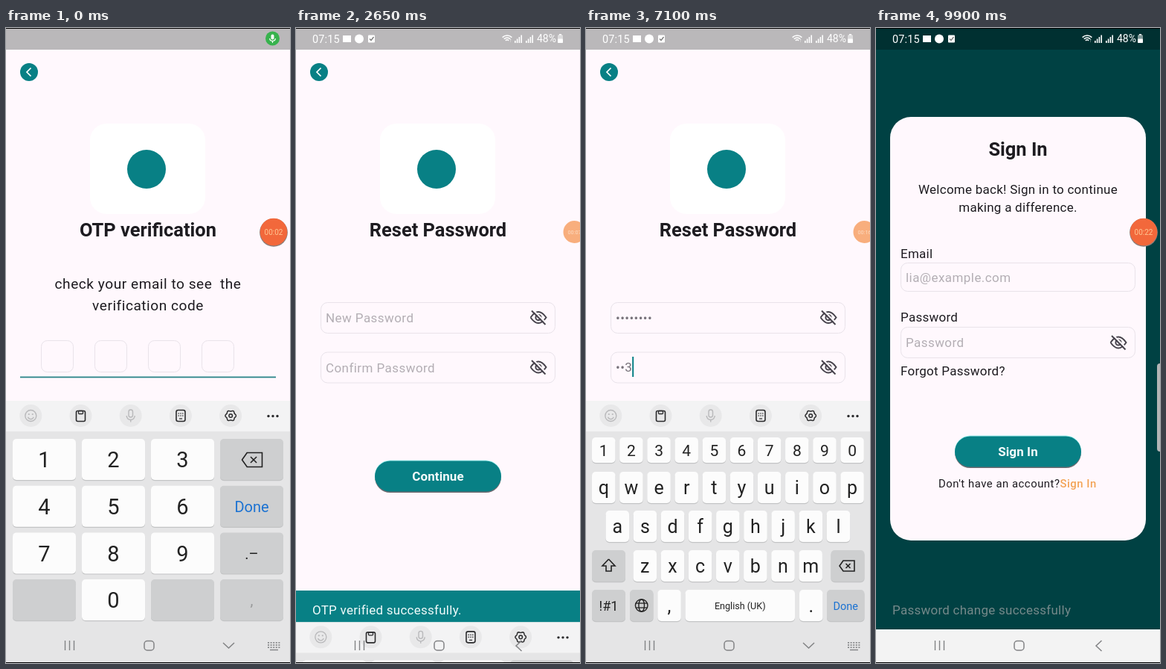
Animation, 382 px wide and 850 px high, one loop 9950 ms. Source, as an HTML page with a canvas:

```html
<!DOCTYPE html>
<html lang="en">
<head>
<meta charset="utf-8">
<title>Password reset</title>
<style>
  html, body { margin: 0; width: 100%; height: 100%; overflow: hidden; background: #fff8fd; }
  canvas { display: block; }
</style>
</head>
<body>
<canvas id="stage" width="382" height="850"></canvas>
<script>
const LOOP = 9950, W = 382, H = 850, NAV = 805;
const TEAL = '#088085', PAGE = '#fff8fd', INK = '#1d1b20', HINT = '#b3aeb4', EDGE = '#e9e3ea';
const DP = 382 / 360;
const g = document.getElementById('stage').getContext('2d');

// When each character appears
const otpKeys = [600, 1050, 1600, 2200];
const newKeys = [4550, 4750, 4900, 5050, 5250, 5500, 6200, 6300];
const confirmKeys = [6700, 6900, 7050, 7250, 7400, 7550, 7700, 8200];

const clamp = x => Math.max(0, Math.min(1, x));
const ramp = (t, a, b) => clamp((t - a) / (b - a));
const ease = p => p < .5 ? 4 * p ** 3 : 1 - 4 * (1 - p) ** 3;
const move = (t, a, b) => ease(ramp(t, a, b));
const typed = (keys, t) => keys.filter(k => k <= t).length;

function box(x, y, w, h, r, fill, stroke, lw = 1) {
  g.beginPath();
  g.roundRect(x, y, w, h, r);
  if (fill) { g.fillStyle = fill; g.fill(); }
  if (stroke) { g.strokeStyle = stroke; g.lineWidth = lw; g.stroke(); }
}
function disc(x, y, r, fill) {
  g.beginPath();
  g.arc(x, y, r, 0, 7);
  g.fillStyle = fill;
  g.fill();
}
function ring(x, y, r, color, lw) {
  g.beginPath();
  g.arc(x, y, r, 0, 7);
  g.strokeStyle = color;
  g.lineWidth = lw;
  g.stroke();
}
function line(color, lw, ...pts) {
  g.beginPath();
  for (let i = 0; i < pts.length; i += 2) g.lineTo(pts[i], pts[i + 1]);
  g.strokeStyle = color;
  g.lineWidth = lw;
  g.stroke();
}
// y is the middle of the capitals
function text(s, x, y, size, color, { align = 'left', weight = 400, gap = 0 } = {}) {
  g.font = `${weight} ${size}px Roboto, sans-serif`;
  g.letterSpacing = gap + 'px';
  g.textAlign = align;
  g.fillStyle = color;
  g.fillText(s, x, y + size * .355);
  return g.measureText(s).width;
}
const mid = (s, x, y, size, color, weight = 400, gap = 0) =>
  text(s, x, y, size, color, { align: 'center', weight, gap });

function caret(x, y, t, since) {
  if (t >= since && Math.floor((t - since) / 250) % 2 === 0) {
    g.fillStyle = TEAL;
    g.fillRect(x, y - 14, 2, 27);
  }
}
function eyeOff(x, y) {
  const c = '#47434c';
  g.beginPath();
  g.moveTo(x - 10.5, y);
  g.quadraticCurveTo(x, y - 15, x + 10.5, y);
  g.quadraticCurveTo(x, y + 15, x - 10.5, y);
  g.strokeStyle = c;
  g.lineWidth = 2;
  g.stroke();
  ring(x, y, 3.6, c, 2);
  line(PAGE, 2, x - 7, y - 10, x + 11, y + 8);
  line(c, 2, x - 9, y - 9, x + 9.5, y + 9.5);
}
function button(label, cy) {
  box(106, cy - 19, 170, 41, 20.5, '#6d6a70');
  box(106, cy - 21.5, 170, 41, 20.5, '#9ff0ee');
  box(106, cy - 20.5, 170, 41, 20.5, TEAL);
  mid(label, 191, cy, 16 * DP, '#f4fbfb', 700, .1);
}
function field(y, h, hint) {
  box(33.5, y + .5, 315, h, 9, null, EDGE);
  if (hint) text(hint, 40, y + h / 2 + .5, 16 * DP, HINT, { gap: .45 });
}
function secretField(y, hint, keys, focus, blur, t) {
  const n = t < 9150 ? typed(keys, t) : 0, cy = y + 20.5;
  field(y, 41, n ? '' : hint);
  const last = n ? keys[n - 1] : focus;
  const shown = n && t - last < 750 && t < blur;
  const s = shown ? '•'.repeat(n - 1) + n : '•'.repeat(n);
  const w = text(s, 40, cy, 16 * DP, '#77727a', { gap: .4 });
  if (t < blur) caret(40 + w, cy, t, last);
  eyeOff(326, cy);
}
function header(title) {
  g.fillStyle = PAGE;
  g.fillRect(0, 0, W, NAV);
  g.fillStyle = '#bab8ba';
  g.fillRect(0, 0, W, 29);
  disc(31, 59, 12, TEAL);
  line('#fff', 1.7, 33.5, 53.5, 28, 59, 33.5, 64.5);
  box(113, 128, 155, 121, 22, '#fff');
  disc(189, 189, 26, TEAL);
  mid(title, 191, 270, 24 * DP, INK, 700);
}
function otpPage(t) {
  header('OTP verification');
  mid('check your email to see  the', 191, 342.5, 18 * DP, INK, 400, .53);
  mid('verification code', 191, 371, 18 * DP, INK, 400, .53);
  const n = typed(otpKeys, t);
  for (let i = 0; i < 4; i++) {
    const x = 47.5 + 72 * i;
    box(x, 418.5, 43, 42, 8, null, EDGE);
    if (i < n) mid('5984'[i], x + 20.5, 440.7, 16 * DP, INK);
    else if (i === n) caret(x + 20, 439.5, t, n ? otpKeys[n - 1] : -250);
  }
  g.fillStyle = '#2b8589';
  g.fillRect(19, 466.5, 344, 1.8);
  button('Resend code', 598);
}
function resetPage(t) {
  header('Reset Password');
  secretField(367, 'New Password', newKeys, 3750, 6600, t);
  secretField(433.5, 'Confirm Password', confirmKeys, 6600, 8800, t);
  button('Continue', 600);
}
function signInPage() {
  g.fillStyle = '#004143';
  g.fillRect(0, 0, W, NAV);
  g.fillStyle = '#003031';
  g.fillRect(0, 0, W, 29);
  box(19, 119, 344, 567, 28, PAGE);
  mid('Sign In', 191, 162, 24 * DP, INK, 700);
  mid('Welcome back! Sign in to continue', 191, 216, 16 * DP, INK, 400, .27);
  mid('making a difference.', 191, 240, 16 * DP, INK, 400, .27);
  const label = { gap: .27 };
  text('Email', 33, 302, 16 * DP, INK, label);
  field(314, 38, 'lia@example.com');
  text('Password', 33, 387, 16 * DP, INK, label);
  field(400, 41, 'Password');
  eyeOff(326, 421);
  text('Forgot Password?', 33, 459, 16 * DP, INK, label);
  button('Sign In', 567);
  const w = text("Don't have an account?", 84, 609.5, 14 * DP, INK, { gap: .53 });
  text('Sign In', 84 + w, 609.5, 14 * DP, '#f3a457', { gap: .53, weight: 500 });
  text('Password change successfully', 22, 779, 16 * DP, '#75898a', { gap: .27 });
}
function dim(t, alpha, start) {
  if (alpha <= 0) return;
  g.fillStyle = `rgba(0,0,0,${alpha})`;
  g.fillRect(0, 0, W, NAV);
  ring(191, 402, 25, '#3b3a3b', 8.5);
  const p = ((t - start) / 700 % 1 + 1) % 1, a = -Math.PI / 2 + p * 6.28;
  g.beginPath();
  g.arc(191, 402, 25, a, a + .02 + 3 * Math.sin(p * Math.PI) ** 2);
  g.lineCap = 'round';
  g.strokeStyle = TEAL;
  g.lineWidth = 9;
  g.stroke();
  g.lineCap = 'butt';
}

// Keyboard
function toolbar() {
  g.fillStyle = '#f3f3f4';
  g.fillRect(0, 499, W, 41);
  const dark = '#2b2b2d', pale = '#b9b9bb', y = 519;
  for (let i = 0; i < 5; i++) disc(33.3 + 67.2 * i, y, 15, '#e8e8e9');
  ring(33.3, y, 7.5, pale, 1.4);
  disc(30.8, y - 2, 1.1, pale);
  disc(35.8, y - 2, 1.1, pale);
  g.beginPath();
  g.arc(33.3, y + .5, 4, .3, 2.84);
  g.stroke();
  box(94.5, y - 6.5, 12, 14, 2, null, dark, 1.6);
  box(97.5, y - 6.5, 6, 4, 1, null, dark, 1.3);
  box(165, y - 8, 5.5, 10, 3, null, pale, 1.4);
  g.beginPath();
  g.arc(167.7, y, 5.5, 0, Math.PI);
  g.stroke();
  line(pale, 1.4, 167.7, y + 5.5, 167.7, y + 8.5);
  box(229, y - 7.5, 12, 15, 2.5, null, dark, 1.6);
  for (let i = 0; i < 6; i++) disc(232.2 + i % 3 * 2.8, y - 3 + (i > 2) * 3, .8, dark);
  line(dark, 1.2, 233, y + 4, 237, y + 4);
  g.beginPath();
  for (let i = 0; i <= 48; i++) {
    const a = i / 48 * 2 * Math.PI, r = 6.6 + .7 * Math.cos(6 * a);
    g.lineTo(302.2 + r * Math.cos(a), y + r * Math.sin(a));
  }
  g.strokeStyle = dark;
  g.lineWidth = 1.5;
  g.stroke();
  ring(302.2, y, 2.3, dark, 1.5);
  for (const x of [353, 359, 365]) disc(x, y + .5, 1.7, dark);
}
function key(x, y, w, h, label, size, { gray, color = '#222', down } = {}) {
  box(x, y + 1.2, w, h, 5, '#c3c4c5');
  box(x, y, w, h, 5, down ? '#dcdddf' : gray ? '#cecfd0' : '#fcfcfc');
  if (label) mid(label, x + w / 2, y + h / 2 + .5, size, color);
}
function backspace(x, y, s) {
  line('#222', 1.6, x - 10 * s, y, x - 5 * s, y - 7 * s, x + 10 * s, y - 7 * s,
    x + 10 * s, y + 7 * s, x - 5 * s, y + 7 * s, x - 10 * s, y, x - 5 * s, y - 7 * s);
  line('#222', 1.6, x - 1.5 * s, y - 3 * s, x + 4.5 * s, y + 3 * s);
  line('#222', 1.6, x + 4.5 * s, y - 3 * s, x - 1.5 * s, y + 3 * s);
}
const pressed = (keys, t) => keys.findIndex(k => t >= k - 10 && t < k + 45);

function numberPad(t) {
  const down = '598'[pressed(otpKeys, t)];
  const rows = [['1', '2', '3', ''], ['4', '5', '6', 'Done'], ['7', '8', '9', '.–'], ['', '0', '', ',']];
  rows.forEach((row, r) => row.forEach((label, c) => {
    const gray = c === 3 || !label;
    key(9 + 93 * c, 550 + 62.7 * r, 85, 55, label, gray ? 20 : 29,
      { gray, down: label && label === down, color: label === 'Done' ? '#1b72d2' : label === ',' ? '#98999a' : '#222' });
  }));
  backspace(331, 578, 1.35);
}
function letters(t) {
  const down = Math.max(pressed(newKeys, t), pressed(confirmKeys, t));
  const row = (s, x, y, h, size) => [...s].forEach((ch, i) =>
    key(x + 37.15 * i, y, 31.5, h, ch, size, { down: h < 40 && i === down }));
  row('1234567890', 8, 548, 34, 21);
  row('qwertyuiop', 8, 594, 42, 25);
  row('asdfghjkl', 26.5, 646, 42, 25);
  row('zxcvbnm', 63.5, 699, 42, 25);
  key(8, 699, 45, 42, '', 0, { gray: 1 });
  line('#222', 1.6, 30.5, 711, 22, 720, 27, 720, 27, 727, 34, 727, 34, 720, 39, 720, 30.5, 711);
  key(329.5, 699, 45, 42, '', 0, { gray: 1 });
  backspace(351, 720, 1);
  key(8, 752, 45, 42, '!#1', 18, { gray: 1 });
  key(59, 752, 31.5, 42, '', 0, { gray: 1 });
  ring(74.7, 773, 8.3, '#222', 1.4);
  g.beginPath();
  g.ellipse(74.7, 773, 3.8, 8.3, 0, 0, 7);
  g.stroke();
  line('#222', 1.3, 67, 770, 82.4, 770);
  line('#222', 1.3, 67, 776, 82.4, 776);
  key(96.3, 752, 31.5, 42, ',', 25);
  key(133.5, 752, 147.5, 42, 'English (UK)', 12.6);
  key(287, 752, 31.5, 42, '.', 25);
  key(324, 752, 50.5, 42, 'Done', 14.5, { gray: 1, color: '#1b72d2' });
  if (down >= 0) {
    const x = 24 + 37.15 * down;
    box(Math.max(4, x - 21), 500, 42, 42, 7, '#fcfcfc', '#d8d8d9');
    mid(down + 1, Math.max(25, x), 521, 26, '#222');
  }
}
function keyboardLevel(t) {
  if (t < 2300) return 1 - move(t, 2000, 2212);
  if (t < 3000) return .19 * move(t, 2480, 2600) * (1 - move(t, 2600, 2740));
  return move(t, 3600, 3850) * (1 - move(t, 8800, 8980));
}
function bottomBar(t) {
  const level = keyboardLevel(t), open = level > .95, c = '#828385';
  g.fillStyle = '#f3f3f3';
  g.fillRect(0, NAV, W, H - NAV);
  if (level > 0) {
    g.save();
    g.translate(0, 350 * (1 - level));
    g.fillStyle = '#e5e5e6';
    g.fillRect(0, 499, W, 360);
    toolbar();
    t < 3000 ? numberPad(t) : letters(t);
    g.restore();
  }
  for (const x of [79.5, 85.5, 91.5]) line(c, 1.4, x, 820, x, 833);
  box(186, 820.5, 13, 12.5, 4, null, c, 1.5);
  if (open) {
    line(c, 1.5, 292, 823, 299.5, 830, 307, 823);
    for (let i = 0; i < 15; i++) {
      g.fillStyle = c;
      g.fillRect(352 + i % 5 * 3.6, 822 + Math.floor(i / 5) * 3.2, 2, 1.6);
    }
    line(c, 1.4, 355, 832.5, 366, 832.5);
  } else {
    line(c, 1.5, 303.5, 820, 296, 827, 303.5, 834);
  }
}

function statusIcons(t) {
  if (t < 550) {
    disc(358.5, 14, 9.5, '#37b24d');
    box(356.5, 8.5, 4, 7, 2, '#fff');
    line('#fff', 1.2, 354.5, 14, 355.5, 16.5, 358.5, 17.5, 361.5, 16.5, 362.5, 14);
    line('#fff', 1.2, 358.5, 17.5, 358.5, 20);
    return;
  }
  const c = '#fff';
  text('07:15', 22, 14.5, 14.4, c, { gap: .2 });
  g.fillStyle = c;
  g.fillRect(63, 10, 11, 9);
  disc(85, 14.5, 6, c);
  box(97, 9.5, 9, 10, 1, c);
  line('#777', 1.3, 99, 14.5, 101, 16.5, 104.5, 12);
  for (const r of [3, 6, 9]) {
    g.beginPath();
    g.arc(284, 19, r, -2.35, -.79);
    g.strokeStyle = c;
    g.lineWidth = 1.5;
    g.stroke();
  }
  text('↑', 287, 17, 7, c);
  for (const x of [294, 309])
    for (let i = 0; i < 4; i++) {
      g.fillStyle = c;
      g.fillRect(x + i * 2.8, 17 - i * 2.5, 1.6, 3 + i * 2.5);
    }
  text('48%', 324, 14.5, 14, c);
  g.globalAlpha = .5;
  box(352, 9, 7, 11, 1.5, c);
  g.globalAlpha = 1;
  box(352, 14.5, 7, 5.5, 1, c);
  g.fillStyle = c;
  g.fillRect(354, 8, 3, 1.5);
}
function recorder(t) {
  const dock = t < 9800 ? move(t, 700, 950) : 0;
  const x = 360 + 14.5 * dock, r = 18.3 - 3.3 * dock;
  const sec = 2 + Math.floor(t / 1000 * 2.03);
  g.globalAlpha = 1 - .32 * dock;
  if (dock < 1) disc(x, 273.8, r + .6, '#8b7f7c');
  disc(x, 273, r, dock > .5 ? '#f58a3f' : '#f2683b');
  mid('00:' + String(sec).padStart(2, '0'), x, 273.5, 10 - 2.7 * dock, dock > .5 ? '#fff3e6' : '#ffc692');
  g.globalAlpha = 1;
}
function snackbar(t) {
  const h = 52 * move(t, 2480, 2610) * (1 - move(t, 3540, 3640));
  if (h <= 0) return;
  g.save();
  g.beginPath();
  g.rect(0, NAV - h, W, h);
  g.clip();
  g.fillStyle = TEAL;
  g.fillRect(0, NAV - 52, W, 52);
  text('OTP verified successfully.', 22, 779, 16 * DP, '#f0fafa', { gap: .27 });
  g.restore();
}

function draw(t) {
  g.clearRect(0, 0, W, H);
  if (t < 2500) {
    otpPage(t);
    dim(t, .5 * ramp(t, 2210, 2290) * (1 - ramp(t, 2420, 2490)), 2250);
  } else if (t < 9500) {
    resetPage(t);
    snackbar(t);
    dim(t, .7 * ramp(t, 8990, 9140), 9250);
  } else {
    signInPage();
  }
  bottomBar(t);
  statusIcons(t);
  if (t >= 8900) box(378, 449, 8, 118, 4, '#b4b5b6');
  recorder(t);
  g.fillStyle = '#000';
  g.fillRect(0, 0, W, 1);
  g.fillRect(0, H - 1, W, 1);
}

const begin = performance.now();
function tick() {
  draw((performance.now() - begin) % LOOP);
  requestAnimationFrame(tick);
}
tick();
</script>
</body>
</html>
```
